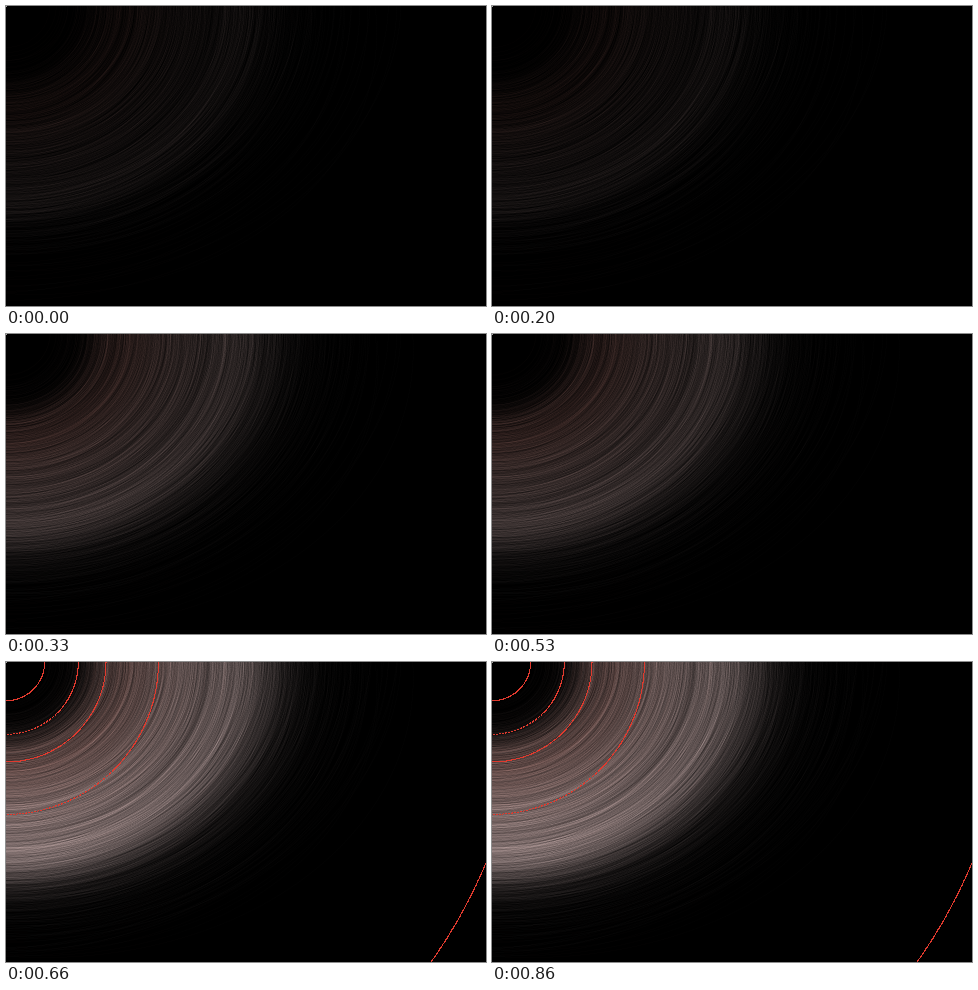
These frames come from a looping animation (480 px wide and 300 px high, 0.99 s). An HTML page with a canvas:

```html
<!DOCTYPE html>
<html lang="en">
<head>
<meta charset="utf-8">
<title>Orbits</title>
<style>
  html, body { margin: 0; width: 100%; height: 100%; overflow: hidden; background: #000; }
  canvas { display: block; width: 480px; height: 300px; }
</style>
</head>
<body>
<canvas id="sky" width="480" height="300"></canvas>
<script>
const start = performance.now();
const W = 480, H = 300, STEP_MS = 330, AU = 100;
const ctx = document.getElementById('sky').getContext('2d');

let seed = 20117;
function random() {
  seed = (seed + 0x6D2B79F5) | 0;
  let t = Math.imul(seed ^ (seed >>> 15), 1 | seed);
  t = (t + Math.imul(t ^ (t >>> 7), 61 | t)) ^ t;
  return ((t ^ (t >>> 14)) >>> 0) / 4294967296;
}
const spread = () => random() + random() + random() - 1.5;

// Relative number of orbits crossing the vertical axis at each distance.
const belt = [[38, 0], [56, .03], [70, .12], [85, .48], [105, .76], [150, .88],
  [196, 1], [208, .72], [230, .2], [250, .04], [300, 0]];
function density(r) {
  const i = belt.findIndex(p => p[0] > r);
  if (i < 1) return 0;
  const [r0, d0] = belt[i - 1], [r1, d1] = belt[i];
  return d0 + (d1 - d0) * (r - r0) / (r1 - r0);
}
function pickRadius() {
  for (;;) {
    const r = 38 + 262 * random();
    if (random() < density(r)) return r;
  }
}

const light = new Float32Array(W * H * 3);
const GLOW = 1.6, TOTAL = 10000;

function addOrbit(index) {
  const b = pickRadius();
  const a = b + .0011 * b * b + spread() * b * .06;
  const tilt = spread() * .15, cos = Math.cos(tilt), sin = Math.sin(tilt);
  const dx = spread() * b * .04, dy = spread() * b * .03;
  // The first, inner orbits are the reddest.
  const rust = .3 * (1 - index / TOTAL) * Math.min(1, (110 / b) ** 2);
  const green = .92 - rust, blue = .92 - 1.2 * rust;
  const step = .5 / a;
  for (let t = -.2; t < 1.8; t += step) {
    const c = Math.cos(t), s = Math.sin(t);
    const x = Math.floor(a * c * cos - b * s * sin + dx);
    const y = Math.floor(a * c * sin + b * s * cos + dy);
    if (x < 0 || y < 0 || x >= W || y >= H) continue;
    const glow = GLOW * step * Math.hypot(a * s, b * c);
    const i = (y * W + x) * 3;
    light[i] += glow;
    light[i + 1] += glow * green;
    light[i + 2] += glow * blue;
  }
}

function snapshot() {
  const image = ctx.createImageData(W, H);
  for (let i = 0; i < W * H; i++) {
    for (let k = 0; k < 3; k++) image.data[i * 4 + k] = light[i * 3 + k];
    image.data[i * 4 + 3] = 255;
  }
  return image;
}

let drawn = 0;
const stages = [1500, 4500, TOTAL].map(count => {
  for (; drawn < count; drawn++) addOrbit(drawn);
  return snapshot();
});

function drawPlanet(radius, dotted) {
  for (let t = 0; t < Math.PI / 2; t += .5 / radius) {
    const x = Math.floor(radius * Math.cos(t)), y = Math.floor(radius * Math.sin(t));
    if (dotted && y > x && x % 3 === 0) continue;
    ctx.fillRect(x, y, 1, 1);
  }
}

function drawPlanets() {
  ctx.fillStyle = '#e03a2e';
  drawPlanet(.387 * AU);
  drawPlanet(.723 * AU, true);
  drawPlanet(AU);
  drawPlanet(1.524 * AU, true);
  drawPlanet(5.203 * AU);
}

function drawSun() {
  ctx.fillStyle = '#aaa';
  ctx.fillRect(0, 0, 1, 1);
}

let shown = -1;
function frame(now) {
  const stage = Math.floor(Math.max(0, now - start) / STEP_MS) % stages.length;
  if (stage !== shown) {
    shown = stage;
    ctx.putImageData(stages[stage], 0, 0);
    if (stage === 2) drawPlanets();
    drawSun();
  }
  requestAnimationFrame(frame);
}
frame(start);
</script>
</body>
</html>
```
